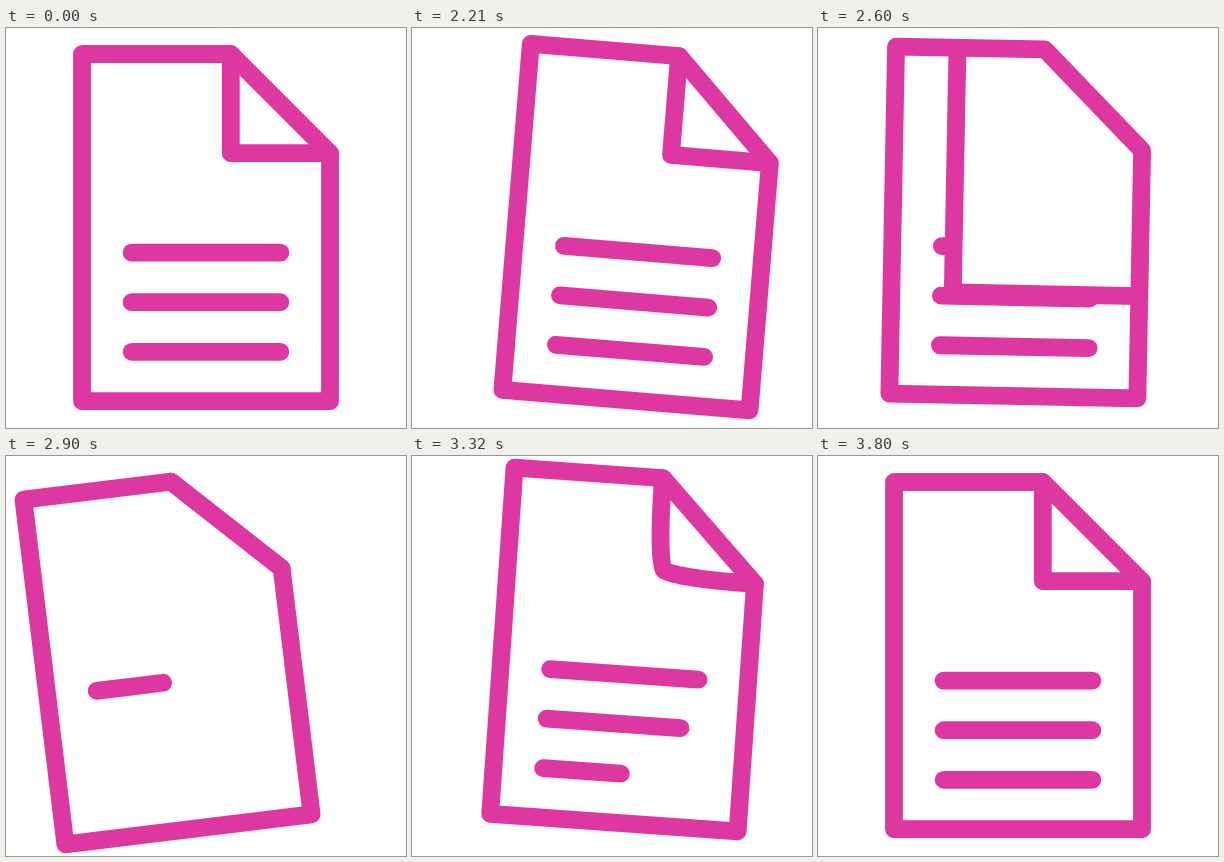
An HTML page with a canvas for the animation above (3.83 s loop, 400x400 px).

```html
<!DOCTYPE html>
<html lang="en">
<head>
<meta charset="utf-8">
<title>Turning page</title>
<style>
html, body { margin: 0; width: 100%; height: 100%; overflow: hidden; background: #fff; }
canvas { display: block; }
</style>
</head>
<body>
<canvas id="stage" width="400" height="400"></canvas>
<script>
const ctx = document.getElementById('stage').getContext('2d');
const LOOP = 3830;
const LEFT = 76, TOP = 26, RIGHT = 324, BOTTOM = 373.2;
const FOLD_X = 224.8, FOLD_Y = 125.2;
const ROWS = [224.6, 274.2, 323.8], ROW_X = 125.6, ROW_LENGTH = 148.8;
const ROW_STARTS = [2691, 2958, 3089], ROW_TIME = 450;

// time, angle in degrees, centre x, centre y
const SWAY = [
  [2000, 0, 200, 199.6],
  [2410, 9, 254, 198.2],
  [2450, 8.46, 251, 198],
  [2540, 4.5, 222.6, 194.7],
  [2600, 1.15, 199, 194.5],
  [2700, -3.8, 174, 196.3],
  [2900, -6.94, 161.5, 201],
  [3080, -4.5, 181, 201],
  [3320, 4, 214, 193.5],
  [3400, 4.6, 217, 191.7],
  [3620, 1.5, 206, 195.3],
  [3800, 0, 200, 199.6]
];

const mix = (a, b, k) => a + (b - a) * k;

function ease(t, start, end) {
  const u = Math.min(1, Math.max(0, (t - start) / (end - start)));
  return u * u * (3 - 2 * u);
}

const secant = (i, col) =>
  (SWAY[i + 1][col] - SWAY[i][col]) / (SWAY[i + 1][0] - SWAY[i][0]);

// Slope at a key: flat at turning points and at both ends
function slope(i, col) {
  if (i === 0 || i === SWAY.length - 1) return 0;
  const a = secant(i - 1, col), b = secant(i, col);
  return a * b > 0 ? 2 * a * b / (a + b) : 0;
}

function sway(t, col) {
  const last = SWAY.length - 1;
  if (t <= SWAY[0][0]) return SWAY[0][col];
  if (t >= SWAY[last][0]) return SWAY[last][col];
  const i = SWAY.findIndex(key => key[0] > t) - 1;
  const span = SWAY[i + 1][0] - SWAY[i][0];
  const u = (t - SWAY[i][0]) / span, v = 1 - u;
  return mix(SWAY[i][col], SWAY[i + 1][col], u * u * (3 - 2 * u)) +
    span * u * v * (v * slope(i, col) - u * slope(i + 1, col));
}

function line(points, closed) {
  ctx.beginPath();
  points.forEach(([x, y]) => ctx.lineTo(x, y));
  if (closed) ctx.closePath();
  ctx.stroke();
}

const row = (y, k) => k > 0.002 && line([[ROW_X, y], [ROW_X + ROW_LENGTH * k, y]]);

// The old fold sweeps across the page and hides the old rows
function oldPage(k) {
  const x = mix(FOLD_X, LEFT, k), y = mix(FOLD_Y, BOTTOM, k);
  ROWS.forEach(rowY => row(rowY, 1));
  ctx.fillRect(x, TOP, RIGHT - x, y - TOP);
  line([[x, TOP], [x, y], [RIGHT, y]]);
}

// The new fold bends out from the diagonal edge
function newFold(k) {
  const x = mix((FOLD_X + RIGHT) / 2, FOLD_X, k);
  const y = mix((TOP + FOLD_Y) / 2, FOLD_Y, k);
  const soft = 25 * (1 - k), arm = 66 * k;
  ctx.beginPath();
  ctx.moveTo(FOLD_X, TOP);
  ctx.bezierCurveTo(FOLD_X, TOP + arm, x - soft, y - soft, x, y);
  ctx.bezierCurveTo(x + soft, y + soft, RIGHT - arm, FOLD_Y, RIGHT, FOLD_Y);
  ctx.stroke();
}

function draw(t) {
  ctx.setTransform(1, 0, 0, 1, 0, 0);
  ctx.fillStyle = '#fff';
  ctx.fillRect(0, 0, 400, 400);
  ctx.strokeStyle = '#dd38a1';
  ctx.lineWidth = 17.8;
  ctx.lineCap = ctx.lineJoin = 'round';

  ctx.translate(sway(t, 2), sway(t, 3));
  ctx.rotate(sway(t, 1) * Math.PI / 180);
  ctx.translate(-200, -199.6);

  const turn = ease(t, 2400, 2760);
  if (turn < 1) oldPage(turn);
  else newFold(ease(t, 2980, 3430));
  ROWS.forEach((y, i) => row(y, ease(t, ROW_STARTS[i], ROW_STARTS[i] + ROW_TIME)));
  line([[LEFT, TOP], [FOLD_X, TOP], [RIGHT, FOLD_Y], [RIGHT, BOTTOM], [LEFT, BOTTOM]], true);
}

const begin = performance.now();
function tick() {
  draw((performance.now() - begin) % LOOP);
  requestAnimationFrame(tick);
}
tick();
</script>
</body>
</html>
```
